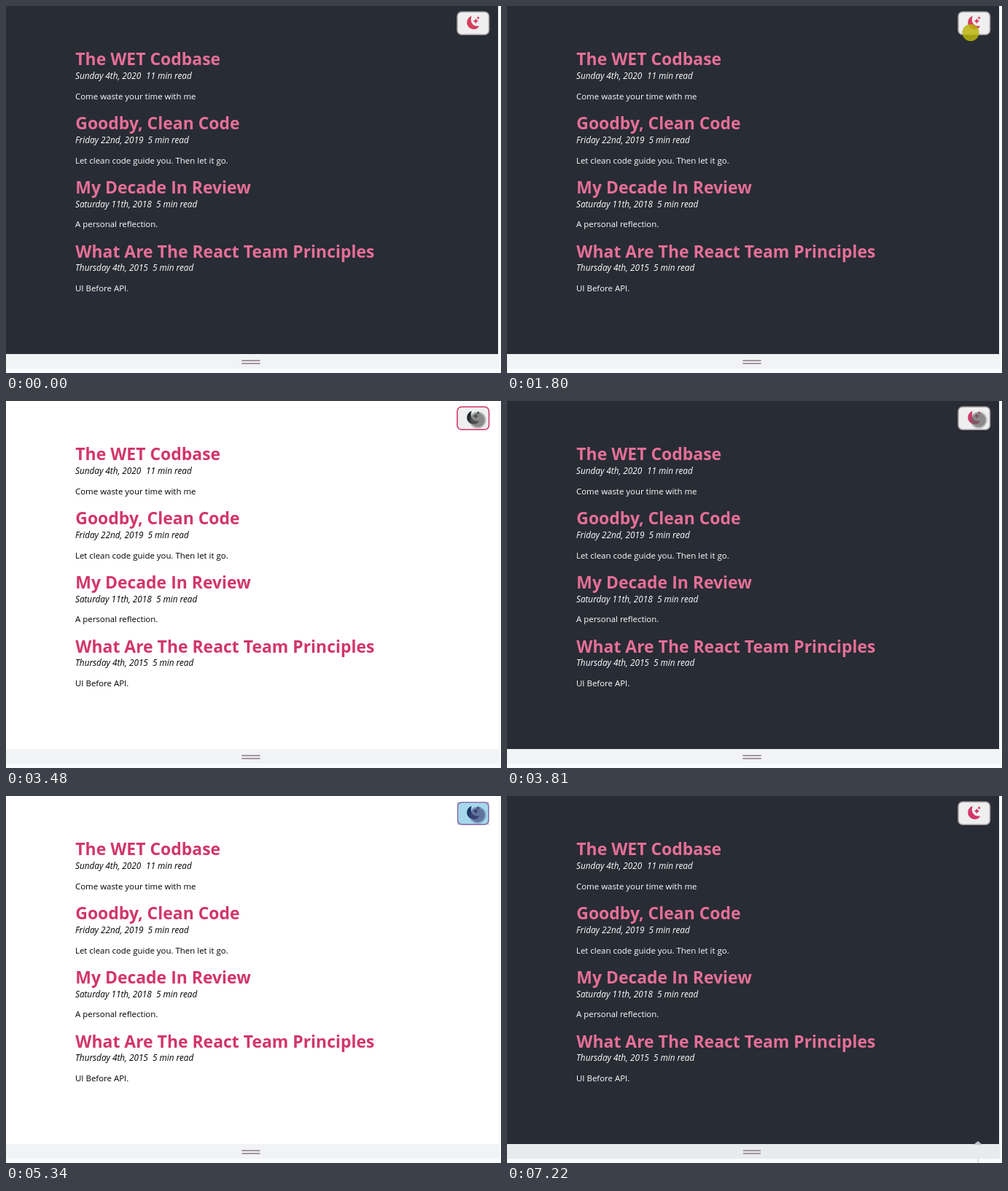
An HTML page that plays this animation: 679 by 503 pixels, repeating every 7620 ms.

```html
<!DOCTYPE html>
<html lang="en">
<head>
<meta charset="utf-8">
<title>Blog theme toggle</title>
<style>
  html, body { margin: 0; width: 100%; height: 100%; overflow: hidden; background: #f9fafb; }
  svg { display: block; font-family: "Open Sans", "Noto Sans", sans-serif; }
  .title { font-size: 22.95px; font-weight: 700; }
  .meta { font-size: 11.75px; font-style: italic; }
  .body { font-size: 11.45px; }
</style>
</head>
<body>
<svg width="679" height="503" viewBox="0 0 679 503">
  <rect width="679" height="503" fill="#f9fafb"/>
  <rect id="page" width="675" height="477"/>
  <g id="posts"></g>
  <rect id="corners" x="619" y="8" width="43.5" height="31.5" fill="#bccbe6"/>
  <rect id="button" rx="6"/>
  <g id="icon" transform="translate(632 14) scale(1.125)"></g>
  <rect id="bar" y="477" width="676" height="20"/>
  <path id="handle" stroke="#a5969f" stroke-width="2"/>
  <g id="resize">
    <path d="M640 478L646 473L652 478Z" fill="#c3c4c7"/>
    <path d="M646.5 497V503" stroke="#e6e7ea" stroke-width="3"/>
  </g>
  <g id="pointer">
    <circle id="ring" r="11.5" opacity=".38"/>
    <circle id="dot"/>
  </g>
</svg>
<script>
const LOOP = 7620, TICK = 1000 / 15;
const el = id => document.getElementById(id);
const show = (id, on) => el(id).setAttribute("visibility", on ? "visible" : "hidden");
const set = (id, attrs) => {
  for (const key in attrs) el(id).setAttribute(key, attrs[key]);
};

const posts = [
  ["The WET Codbase", "Sunday 4th, 2020", 192, "11 min read", "Come waste your time with me"],
  ["Goodby, Clean Code", "Friday 22nd, 2019", 194.5, "5 min read", "Let clean code guide you. Then let it go."],
  ["My Decade In Review", "Saturday 11th, 2018", 206, "5 min read", "A personal reflection."],
  ["What Are The React Team Principles", "Thursday 4th, 2015", 201, "5 min read", "UI Before API."]
];
const line = (kind, x, y, text) => `<text class="${kind}" x="${x}" y="${y}">${text}</text>`;
el("posts").innerHTML = posts.map(([title, date, readX, read, body], i) => {
  const y = 81 + i * 88;
  return line("title", 95.3, y, title) + line("meta", 95, y + 19 - i * .2, date) +
    line("meta", readX, y + 19 - i * .2, read) + line("body", 95, y + 47 - i * .3, body);
}).join("");
const titles = document.querySelectorAll(".title");

// Four-pointed sparkle with concave sides
const sparkle = (x, y, r) => {
  const k = r * .24;
  return `M${x} ${y - r}Q${x + k} ${y - k} ${x + r} ${y}Q${x + k} ${y + k} ${x} ${y + r}` +
    `Q${x - k} ${y + k} ${x - r} ${y}Q${x - k} ${y - k} ${x} ${y - r}Z`;
};
const moon = "M6 .3C5.4 1.5 5.2 3 5.2 4.6A7.3 7.3 0 0 0 14.3 11.7Q15.2 11.9 14.8 12.8" +
  "A8.35 8.35 0 0 1 8.3 16A8.3 8.3 0 0 1 5.1 .1Q5.8-.2 6 .3Z";
el("icon").innerHTML = `<path d="${moon}${sparkle(11, 6, 3.1)}${sparkle(13.9, 2.1, 2.1)}"/>`;

// Pointer path: tick, x, y
const path = [
  [6, 480, 372], [7, 535, 325], [8, 566, 303], [12, 566, 303], [15, 488, 255], [16, 474, 226],
  [19, 545, 110], [22, 632, 39], [23, 632, 39], [26, 636, 36.5], [34, 636, 36.5],
  [38, 609.5, 137.5], [44, 609.5, 137.5], [51, 647, 26], [93, 647, 26],
  [97, 650, 140], [102, 646, 409], [106, 646, 480]
];
const pointerAt = tick => {
  const i = path.findIndex(p => p[0] > tick);
  if (i < 1) return path[path.length - 1];
  const a = path[i - 1], b = path[i];
  const u = (tick - a[0]) / (b[0] - a[0]);
  return a.map((v, n) => v + (b[n] - v) * u);
};
const within = (tick, ...spans) => spans.some(([from, to]) => tick >= from && tick < to);

function render(ms) {
  const tick = Math.floor(ms / TICK + .25);
  const light = within(tick, [29, 56], [80, 92]);
  const selected = within(tick, [80, 95]);
  const pressed = within(tick, [26, 29], [54, 56], [78, 80], [91, 92]);
  const hover = tick >= 106;

  set("page", { fill: light ? "#ffffff" : "#282c34" });
  set("posts", { fill: light ? "#000000" : "#ffffff" });
  titles.forEach(t => t.setAttribute("fill", light ? "#d23669" : "#e66f97"));

  // The selection tint leaves the button's outermost edge uncovered
  show("corners", selected && light);
  set("button", selected
    ? { x: 619.6, y: 8.6, width: 42.4, height: 30.4, "stroke-width": 1.4,
        fill: "#a5d8ed", stroke: light ? "#84659c" : "#6fa9c8" }
    : { x: 619, y: 8, width: 43.5, height: 31.2, "stroke-width": 1.6,
        fill: "#efefef", stroke: light ? "#d23669" : "#a39c9f" });
  set("icon", {
    fill: selected ? (light ? "#1a3560" : "#83477c") : (light ? "#22262d" : tick < 29 ? "#d6405c" : "#d23669")
  });

  set("bar", { fill: hover ? "#e9eaee" : "#f1f3f5" });
  set("handle", { d: hover ? "M324 486H348M324 490H348" : "M323.4 486H348.6M323.4 490H348.6" });
  show("resize", hover);

  show("pointer", tick >= 6 && !hover);
  const [, x, y] = pointerAt(tick);
  set("pointer", { transform: `translate(${x} ${y})` });
  const shade = selected ? (light ? "#45487c" : "#4a6474") : "#606060";
  set("ring", { fill: shade });
  set("dot", pressed
    ? { fill: "#c6c000", opacity: .75, r: 11.5 }
    : { fill: shade, opacity: .53, r: 9.7 });
}

const start = performance.now();
function frame() {
  render((performance.now() - start) % LOOP);
  requestAnimationFrame(frame);
}
frame();
</script>
</body>
</html>
```
